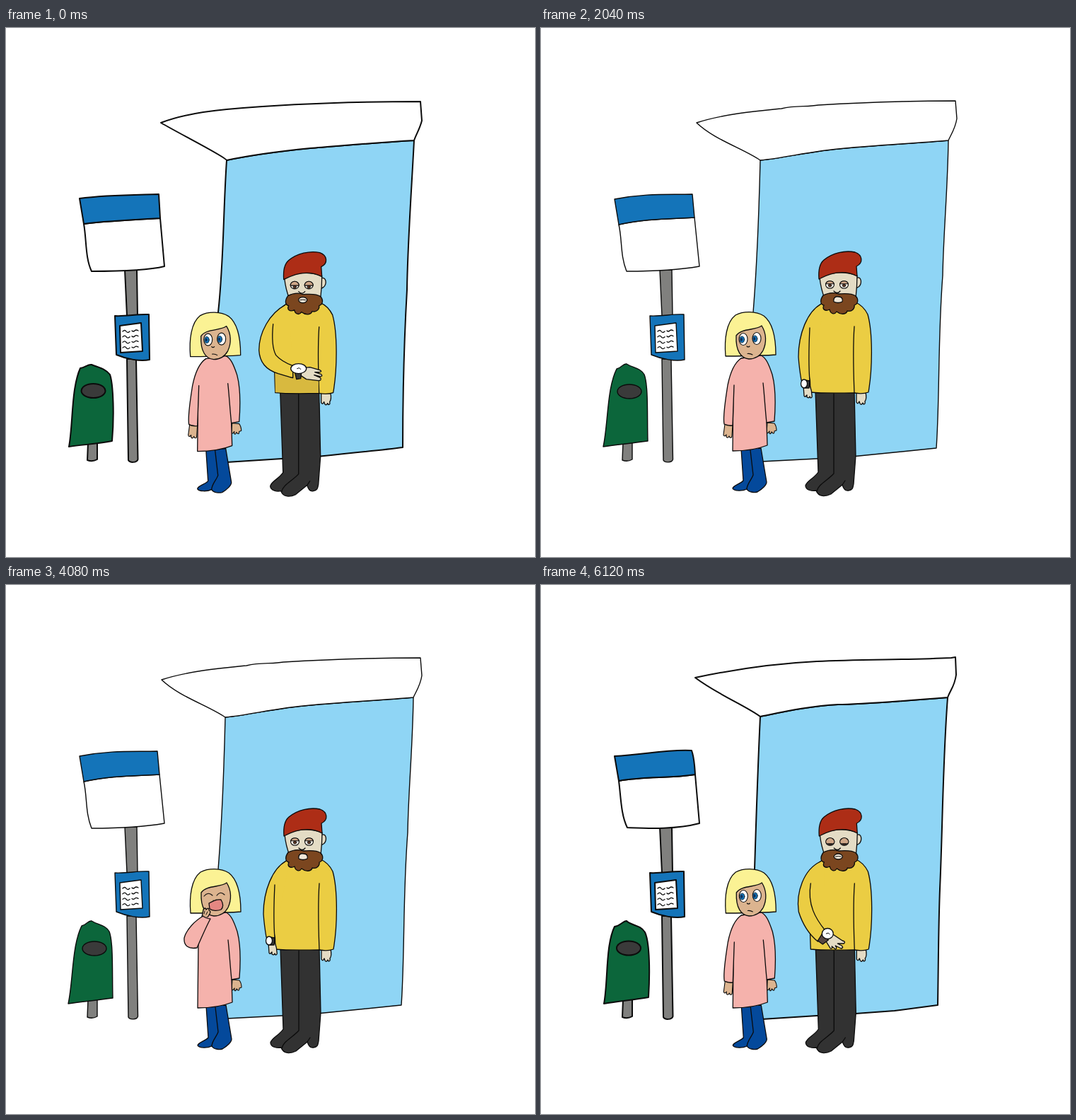
These frames come from a looping animation (748x748 px, 6290 ms). An HTML page:

```html
<!DOCTYPE html>
<html lang="en">
<head>
<meta charset="utf-8">
<title>Waiting at the stop</title>
<style>
  html, body { margin: 0; width: 100%; height: 100%; overflow: hidden; background: #fff; }
  svg { display: block; width: 100%; height: 100%; }
  .off { display: none; }
</style>
</head>
<body>
<svg id="stage" viewBox="0 0 748 748" fill="none" stroke="#0b0b0b" stroke-linejoin="round" stroke-linecap="round"></svg>
<script>
const C = {
  glass: '#8fd5f5', sign: '#1474b9', pole: '#80807e', bin: '#0c663b', dark: '#3a3a3a',
  hair: '#fbf294', girl: '#dcb48f', coat: '#f5b2ac', boots: '#04499b', hat: '#ad2d16',
  man: '#e4dcc5', lid: '#cfa788', beard: '#7b461f', wool: '#ebcd43', shade: '#d8b93f', legs: '#323232'
};
const path = (d, fill = 'none', more = '') => `<path d="${d}" fill="${fill}" ${more}/>`;
const flat = (d, fill) => path(d, fill, 'stroke="none"');
const oval = (x, y, rx, ry, fill, more = '') =>
  `<ellipse cx="${x}" cy="${y}" rx="${rx}" ry="${ry}" fill="${fill}" ${more}/>`;
const group = (id, body) => `<g id="${id}">${body}</g>`;

// Three hand-drawn takes of the street furniture.
const takes = [
  {
    roof: 'M220 134C260 121 310 117 340 114C360 109 376 112 392 109C460 105 525 103 586 103L588 128C586 142 580 150 576 159C530 163 470 166 430 170C380 174 345 184 310 187C285 170 245 158 220 134Z',
    glass: 'M310 187C308 270 305 340 300 402L304 614L312 613L390 609L440 606L500 600L559 594C564 520 561 440 568 350C569 290 575 230 576 159C530 163 470 166 430 170C380 174 345 184 310 187Z',
    head: 'M104 242C150 233 180 236 214 235L217 268C180 270 145 270 110 278Z',
    board: 'M110 278C145 270 180 270 217 268L224 337C190 343 150 344 121 344C112 322 115 300 110 278Z',
    bin: 'M88 592C95 560 93 510 107 482C114 481 116 474 121 475C130 481 140 480 146 490C152 505 150 550 151 584C130 587 110 589 88 592Z',
    hole: [125, 514], move: '0 0'
  },
  {
    roof: 'M218 131C265 121 330 111 390 108C450 105 520 106 580 103L586 102L587 127C585 143 579 148 575 159C500 165 440 169 420 169C380 171 340 180 310 186C288 170 250 155 218 131Z',
    glass: 'M310 186C306 270 304 340 302 402L304 615L312 614L390 609L445 606L500 602L561 594C562 530 562 480 564 430C568 340 568 250 575 159C500 165 440 169 420 169C380 171 340 180 310 186Z',
    head: 'M104 242C145 240 178 232 213 234C217 245 217 255 218 268C180 274 150 270 110 277Z',
    board: 'M110 277C150 270 180 274 218 268C220 290 222 315 224 337C190 346 150 344 122 343C113 325 113 300 110 277Z',
    bin: 'M89 592C95 560 91 510 104 483C112 482 116 475 121 475C128 482 140 480 147 491C154 506 154 550 152 583C130 587 110 588 89 592Z',
    hole: [124, 513.5], move: '.3 0'
  },
  {
    roof: 'M219 134C245 124 280 118 312 115C380 109 480 104 586 104L588 131C585 143 580 150 577 159C520 162 470 167 430 170C390 174 345 180 312 187C310 182 250 152 219 134Z',
    glass: 'M312 187C307 260 308 330 300 402L304 615L312 614L390 609L440 606C480 602 530 597 561 593C561 520 563 440 567 370C568 300 574 220 577 159C520 162 470 167 430 170C390 174 345 180 312 187Z',
    head: 'M104 241C140 236 180 236 216 235L218 269C180 271 140 273 110 277Z',
    board: 'M110 277C140 273 180 271 218 269L224 337C200 343 160 344 121 344C112 325 114 300 110 277Z',
    bin: 'M89 592C95 560 92 510 105 481C112 480 116 475 121 476C130 480 140 481 147 490C152 505 153 550 150 584C130 588 110 589 89 592Z',
    hole: [123.5, 513], move: '-.3 .6'
  }
];

function squiggles() {
  let d = '';
  for (let row = 0; row < 4; row++) {
    const y = 429 + row * 7.7;
    d += `M165 ${y}q3 -3 5 0t5 0M178 ${y - 1}q2 2 4 0t5 0`;
  }
  return path(d, 'none', 'stroke-width="1.3"');
}

const street = t =>
  path(t.glass, C.glass) + path(t.roof, '#fff') +
  path('M168 342L185 342L186 407L171 407Z', C.pole) +
  path('M171 468L184 468L186.500 610C185 615 175 615 173 611Z', C.pole) +
  path(t.board, '#fff') + path(t.head, C.sign) +
  path('M154 407C170 408 187 404 202 405L203 469C190 472 170 468 156 462Z', C.sign) +
  path('M161 421L191 417L193 457L162 459Z', '#fff') + squiggles() +
  path('M116 586L129 586L129 610Q122 614 115 611Z', C.pole) +
  path(t.bin, C.bin) + oval(...t.hole, 17, 10, C.dark);

const girlBase =
  path('M283 595L286 640C282 645 272 646 271 651C273 655 285 655 291 652C294 657 302 657 306 656C313 652 319 646 319 642L311 594Z', C.boots) +
  path('M296 597L300 632C298 638 291 645 291 652') +
  path('M261 464C259 440 262 416 275 406C286 400 304 400 315 407C328 417 332 440 332 462Q322 463 312 463L275 464Z', C.hair) +
  path('M320 558L319 572q2 2 4-2l0 3q2 2 3-2l2 2q2 1 2-3l3-1q0-6-3-10Z', C.girl, 'stroke-width="1.1"') +
  path('M283 467C277 472 273 482 272 505L271 598C290 598 305 596 320 590L319 558L330 556C332 530 331 505 327 490C322 475 318 466 311 463Z', C.coat) +
  path('M314 502C316 520 317 540 319 558') +
  path('M276 435C284 424 303 428 312 421C319 432 319 445 314 456C309 465 301 468 294 468C283 467 275 457 276 435Z', C.girl);

const girlEye = (x, y, look) =>
  oval(x, y, 6, 8.5, '#fff', 'stroke-width="1.1"') +
  oval(x + look, y + .5, 3.3, 4.6, C.sign, 'stroke-width=".7"') +
  oval(x + look - .8, y + .5, 1.4, 2.4, '#102a50', 'stroke="none"');

const girlIdle =
  girlEye(286, 440, -1.7) + girlEye(305, 439, -2.4) +
  path('M291 450q2 2 4 0M292 460.500q4-.5 7 1.500', 'none', 'stroke-width="1.1"');

const girlYawn =
  path('M280 440q6-7 12-1M298 439q5-7 11-1M293 446q2 2 4-1', 'none', 'stroke-width="1.1"') +
  path('M287 450C292 447 299 444 304 445C307 450 308 455 304 459C299 461 292 461 288 458Z', '#e58782');

const girlArms = [
  path('M260 560L258 575q1 4 4 0l0 3q2 3 4-1l1 2q3 1 3-3L271 561Z', C.girl, 'stroke-width="1.1"') +
    flat('M283 467C274 473 268 485 264 505C260 530 257 550 259 560L271 562L273 505L285 473Z', C.coat) +
    path('M283 467C274 473 268 485 264 505C260 530 257 550 259 560Q264 563 271 562L273 505'),
  path('M284 503q6-6 10-5q2 2-2 4q5 1 1 4q0 3-5 4l-4 1Z', C.girl) +
    flat('M281 469C267 478 256 498 257 512C262 520 275 516 286 511L283 500L272 500L286 474Z', C.coat) +
    path('M281 469C267 478 256 498 257 512C262 520 275 516 286 511L283 500L272 500'),
  path('M277 469L279 459q3-4 4 0q4-4 4 1q3 1 1 5l-3 5Z', C.girl) +
    path('M281 461l-1 4M285 462l-2 4', 'none', 'stroke-width="1"') +
    flat('M279 468C268 474 255 487 252 499C251 511 259 515 270 513C276 500 283 485 291 472Z', C.coat) +
    path('M279 468C268 474 255 487 252 499C251 511 259 515 270 513C276 500 282 485 289 472Q284 472 278 468')
];

// Eyelid covering an oval eye down to height h (-1 open, 1 shut).
function eye(x, y, h, drop) {
  const rx = 6, ry = 5.3, w = rx * Math.sqrt(1 - h * h), ly = y + h * ry;
  return oval(x, y, rx, ry, '#f5f1e8', 'stroke-width="1.1"') +
    oval(x, y + drop, 2.2, 2.1, '#5b3421', 'stroke-width=".8"') +
    path(`M${x - w} ${ly}A${rx} ${ry} 0 ${h > 0 ? 1 : 0} 1 ${x + w} ${ly}Z`, C.lid, 'stroke-width="1.1"');
}
const eyes = (h, drop) => eye(408.5, 363, h, drop) + eye(428.5, 363, h, drop);
const looks = [eyes(-.25, 1), eyes(.2, 2.2), eyes(.55, 3), eyes(.1, 2.5)];

const manBase =
  path('M446 514L446 529q2 4 4-1l1 3q2 3 4-1l1 2q3 0 2-4Q461 524 459 515Z', C.man) +
  path('M388 513L392 628C386 637 376 640 374 647C374 654 384 655 389 654C392 663 402 663 410 659L426 646C428 652 430 655 435 654C442 653 441 648 442 645L445 605L443 513Z', C.legs) +
  path('M414 517L414 630C405 640 392 645 390 655M426 646L430 640') +
  path('M396 390C386 396 381 410 380 430C379 460 380 490 381 515C400 517 425 516 443 516Q455 518 463 515C469 480 469 430 462 405C458 397 452 391 445 388Z', C.wool) +
  path('M443 422C441 450 442 490 443 516');

const manHead =
  path('M445 354C453 349 455 362 449 366L444 369Z', C.man) +
  path('M394 353C410 344 430 344 447 350Q447 365 445 382L401 382C396 370 395 362 394 353Z', C.man) +
  path('M393 355C392 342 394 333 400 328C412 318 430 314 444 317C455 321 456 332 446 337L447 351C430 342 410 346 393 355Z', C.hat) +
  path('M414 372q5 5 9 0') +
  path('M399 378C394 385 395 391 400 392C397 398 402 401 408 398C409 404 415 406 418 401C424 406 432 405 433 400C440 402 444 396 443 392C449 390 449 383 445 379C438 374 426 376 420 376C412 373 405 375 399 378Z', C.beard);

const mouths = [
  path('M414 387C413 381 417 379 421 380C426 380 427 384 426 387Q420 390 414 387Z', '#f0e7d8'),
  oval(420, 384, 6, 4, '#f0e7d8') + path('M416 384q4-1 8 0', 'none', 'stroke-width="1"')
];

// The fill runs straight from cuff to shoulder so it hides the side of the body.
const sleeve = (outer, cuff, inner) =>
  flat(`M${outer}L${cuff}L400 394Z`, C.wool) + path(`M${outer}L${cuff}${inner}`);
const watch = (x, y, rx, ry) =>
  oval(x, y, rx, ry, '#fff') + path(`M${x - 2} ${y}l3-1l2 2`, 'none', 'stroke-width="1"');

const manArms = [
  path('M371 506L372 520q1 3 4-1l0 3q3 2 4-1l1 2q3 0 2-4Q383 512 380 506Z', C.man) +
    sleeve('395 391C377 401 364 432 364 465C365 480 367 492 368 498', '380 499', 'C378 475 379 445 380 424') +
    path('M373 498L380 499L379 509L373 509Z', C.dark) + oval(372, 503, 4.5, 6, '#fff'),
  path('M390 506L394 520q3 1 3-4l3 6q3 1 2-4l3 3q3-1 0-6L400 505L396 500Z', C.man) +
    sleeve('395 391C374 400 363 440 365 465C367 480 374 492 381 501', '397 496', 'C384 475 378 455 381 422') +
    watch(389, 503, 8, 8),
  path('M401 501L409 514q3 1 2-3l5 4q3-1 0-5l8 4q4-1 1-4l-6-3l9 0q3-3-2-4L411 493Z', C.man) +
    sleeve('395 391C371 402 360 435 364 462C370 481 380 495 391 504', '402 489', 'C388 472 376 452 381 422') +
    path('M391 503L398 492L406 502L398 508Z', '#594842') + watch(405, 493, 8, 7.5),
  flat('M381 486L442 488L442.300 515L381 514.500Z', C.shade) +
    path('M419 480L430 479L444 483q4 2 0 3l-7 0l9 3q3 3-2 3l-8-2l9 4q2 4-3 4L425 496L416 490Z', C.man) +
    sleeve('395 391C373 403 358 430 358 455C359 475 372 484 385 488C393 490 400 493 406 494', '406 477', 'C398 474 388 469 382 462C377 453 376 438 378 418') +
    path('M409 487L418 487L417 495L411 496Z', C.dark) + watch(414, 481, 11, 7)
];

const set = (name, list) => list.map((body, i) => group(name + i, body)).join('');
const stage = document.getElementById('stage');
stage.innerHTML =
  group('street', set('take', takes.map(street))) +
  group('girl', girlBase + set('face', [girlIdle, girlYawn]) + set('reach', girlArms)) +
  group('man', manBase + set('arm', manArms) + manHead + set('look', looks) + set('mouth', mouths));

const el = id => document.getElementById(id);
const pick = (name, count, on) => {
  for (let i = 0; i < count; i++) el(name + i).classList.toggle('off', i !== on);
};

// Each row: first step, value held until the next row.
const STEP = 170, STEPS = 37;
const armTrack = [[0, 3], [6, 2], [7, 1], [8, 0], [35, 1], [36, 2]];
const reachTrack = [[0, 0], [20, 1], [21, 2], [27, 1], [28, 0]];
const at = (track, n) => track.filter(row => row[0] <= n).pop()[1];

function pose(n) {
  const take = (n < 4 ? n + 2 : n < 25 ? n : n + 1) % 3;
  const arm = at(armTrack, n), reach = at(reachTrack, n);
  pick('take', 3, take);
  pick('arm', 4, arm);
  pick('look', 4, arm);
  pick('mouth', 2, take ? 1 : 0);
  pick('reach', 3, reach);
  pick('face', 2, reach === 2 ? 1 : 0);
  el('street').setAttribute('stroke-width', arm > 1 ? 2 : 1.4);
  for (const id of ['girl', 'man']) {
    el(id).setAttribute('stroke-width', 1.3);
    el(id).setAttribute('transform', `translate(${takes[take].move})`);
  }
}

const start = performance.now();
let last = -1;
function tick() {
  const n = Math.floor(Math.max(0, performance.now() - start) / STEP) % STEPS;
  if (n !== last) pose(last = n);
  requestAnimationFrame(tick);
}
tick();
</script>
</body>
</html>
```
